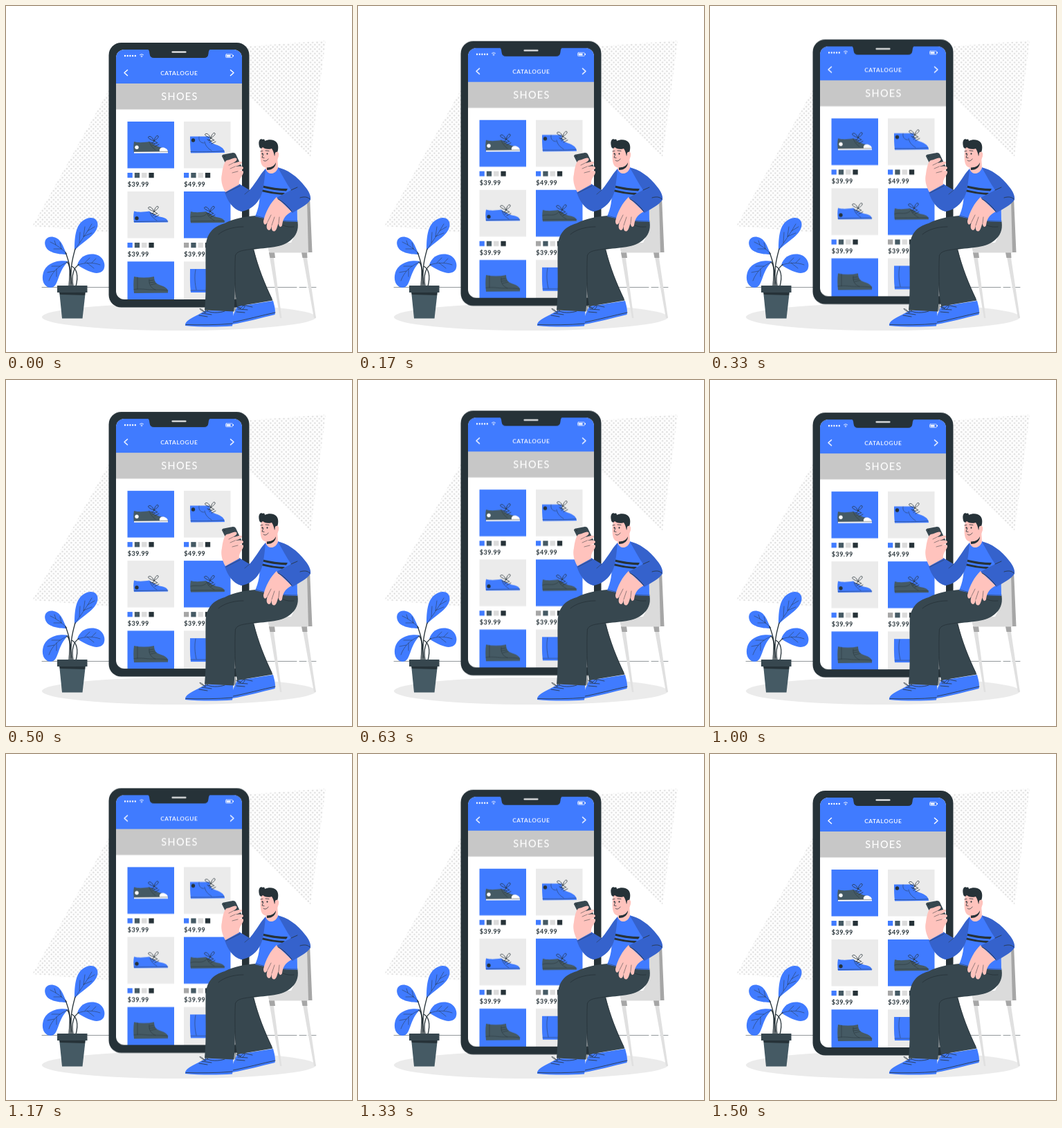
Animation, 500 px wide and 500 px high, one loop 1540 ms. Source, as an HTML page:

```html
<!DOCTYPE html>
<html lang="en">
<head>
<meta charset="utf-8">
<title>Shoe catalogue</title>
<style>
html, body { margin: 0; width: 100%; height: 100%; overflow: hidden; background: #fff; }
svg { display: block; width: 100vw; height: 100vh; }
text { font-family: Lato, "Open Sans", sans-serif; }
.blue { fill: #407bff; }
.deep { fill: #3562cc; }
.ink { fill: #263238; }
.slate { fill: #455a64; }
.cloth { fill: #37474f; }
.pale { fill: #ebebeb; }
.skin { fill: #ffc3bd; }
.white { fill: #fff; }
.line { fill: none; stroke: #263238; stroke-width: .8; stroke-linecap: round; stroke-linejoin: round; }
.thin { stroke-width: .5; }
.wline { fill: none; stroke: #fff; stroke-width: 1.5; stroke-linecap: round; stroke-linejoin: round; }
.price { font-size: 9px; font-weight: 700; letter-spacing: .45px; fill: #263238; }
.title { fill: #fff; text-anchor: middle; }

/* 24 drawings a second: 17 steps up, 18 down, 2 to close */
#phone { animation: float 1540ms -4ms infinite; }
@keyframes float {
  0% { transform: translateY(0); animation-timing-function: steps(17); }
  45.946% { transform: translateY(-9.8px); animation-timing-function: steps(18); }
  94.595% { transform: translateY(.4px); animation-timing-function: steps(2); }
  100% { transform: translateY(-.4px); }
}
</style>
</head>
<body>
<svg viewBox="0 0 500 500">
  <defs>
    <pattern id="dots" width="6.4" height="6.4" patternUnits="userSpaceOnUse">
      <g fill="#e0e0e0"><circle cx="1.6" cy="1.6" r="1.3"/><circle cx="4.8" cy="4.8" r="1.3"/></g>
    </pattern>
    <clipPath id="screen"><rect x="159" y="63" width="182" height="361" rx="12"/></clipPath>
    <g id="swatches">
      <rect x="10.3" width="7.3" height="7.3" class="slate"/>
      <rect x="20.6" width="7.3" height="7.3" fill="#dbdbdb"/>
      <rect x="30.9" width="7.3" height="7.3" class="ink"/>
    </g>
    <g id="laces" class="line">
      <path d="M0 0C-6-2-10-5-8-6C-5-8-2-4 0 0C1-5 4-9 6-7C7-5 3-2 0 0L-3 4M0 0L5 3M-5 2L1 4M-2 6L4 3M1 8L7 5"/>
    </g>
    <path id="low" d="M1 0C8 2 16 1 23 0C27 3 32 6 38 8C45 9 50 11 50 16L1 16.500C0 11 0 5 1 0Z"/>
  </defs>

  <path d="M160 101L38 318L160 328ZM340 59L462 50L440 218L340 119Z" fill="url(#dots)"/>
  <ellipse cx="250" cy="449.500" rx="198" ry="19.500" class="pale"/>
  <path class="line thin" d="M52 406.500H420M424 406.500H434M437 406.500H448"/>

  <g id="phone">
    <rect x="148.500" y="53" width="203" height="382.500" rx="18" class="ink"/>
    <g clip-path="url(#screen)">
      <rect x="159" y="63" width="182" height="361" class="white"/>
      <rect x="159" y="63" width="182" height="49" class="blue"/>
      <rect x="159" y="112" width="182" height="37.500" fill="#c7c7c7"/>
      <path class="ink" d="M203 62C207 63 207 65 207.500 69Q208 75 214 75H286Q292 75 292.500 69C293 65 293 63 297 62Z"/>

      <path d="M172 72H187" stroke="#fff" stroke-width="2.400" stroke-linecap="round" stroke-dasharray="0 3.700"/>
      <path class="wline" stroke-width="1" d="M193.500 70.500Q196 68.600 198.500 70.500M195 72.300Q196 71.500 197 72.300" style="stroke-width:.9"/>
      <circle cx="196" cy="73.600" r=".6" class="white"/>
      <rect x="317.500" y="69.700" width="10" height="4.800" rx="1" class="wline" style="stroke-width:.7"/>
      <path class="white" d="M318.500 70.700h6v2.800h-6zM328 71h1v2h-1z"/>
      <path class="wline" d="M175.500 92.500L171 96.500L175.500 100.500M324.500 92.500L329 96.500L324.500 100.500"/>
      <text class="title" x="250.300" y="99.500" font-size="8.400" font-weight="600" letter-spacing=".6">CATALOGUE</text>
      <text class="title" x="251" y="135.600" font-size="14.500" font-weight="500" letter-spacing="1.300">SHOES</text>

      <path class="blue" d="M175.500 167h67.500v67.500h-67.500zM257 268h67.500v67.500h-67.500zM175.500 369.300h67.500v60h-67.500zM175.500 241h7.300v7.300h-7.300zM257 241h7.300v7.300h-7.300zM175.500 342h7.300v7.300h-7.300z"/>
      <path class="pale" d="M257 167h67.500v67.500h-67.500zM175.500 268h67.500v67.500h-67.500zM257 369.300h67.500v60h-67.500z"/>
      <path fill="#a6a6a6" d="M257 342h7.300v7.300h-7.300z"/>
      <use href="#swatches" x="175.500" y="241"/>
      <use href="#swatches" x="257" y="241"/>
      <use href="#swatches" x="175.500" y="342"/>
      <use href="#swatches" x="257" y="342"/>
      <text class="price" x="175.800" y="260.500">$39.99</text>
      <text class="price" x="257.300" y="260.500">$49.99</text>
      <text class="price" x="175.800" y="361.500">$39.99</text>
      <text class="price" x="257.300" y="361.500">$39.99</text>

      <!-- canvas sneaker -->
      <use href="#low" x="184" y="196" class="slate"/>
      <path class="white" d="M185 210.500L222 210C221 206 224 204 228 204.500C233 206 234.500 209 234 212.500L185 212.800Z"/>
      <circle cx="189" cy="204.300" r="2.700" class="white"/>
      <path class="line thin" d="M185 210.500L234 210.300M207 196C209 202 212 205 216 208"/>
      <use href="#laces" x="214" y="195"/>

      <!-- mid sneaker -->
      <path class="blue" d="M266 188.500H294.500C294 193 296 197 300 199C308 202 316 205 316 212L267 212.500C266 204 266 196 266 188.500Z"/>
      <circle cx="270.500" cy="194" r="2.700" class="ink"/>
      <path class="line thin" d="M267 210.500C280 211 298 211 315 209.500M287 196C288 202 292 206 297 209M279 189C278 194 281 198 286 198"/>
      <use href="#laces" x="296" y="191"/>

      <use href="#low" x="184" y="296.500" class="blue"/>
      <circle cx="189" cy="306.800" r="2.700" class="ink"/>
      <path class="line thin" d="M185 311.500L234 311M208 298C209 303 213 307 218 310"/>
      <use href="#laces" x="214" y="297"/>

      <use href="#low" x="266" y="297" class="slate"/>
      <path class="line thin" d="M267 311L316 310.500M267 305C275 302 284 308 291 299C291 304 296 307 301 310"/>
      <use href="#laces" x="295" y="297"/>

      <!-- boots -->
      <path class="slate" d="M185 391Q199 394 214 391C214 399 218 402 223 403.500C231 406 235 409 234 414.500L185 415C184 407 184 398 185 391Z"/>
      <path class="line thin" d="M185 409.500C196 408 202 410 211 410S227 410 234 411M190 392V409M207 397L213 396M207 400L215 399M209 403L217 401M207 395C206 403 210 408 216 410"/>
      <path class="blue" d="M266 380H296V405L316 414L267 414C265.500 402 266 390 266 380Z"/>
      <path class="line thin" d="M267 411H300M274 381C272 390 273 402 275 410"/>
    </g>
    <path class="wline" style="stroke-width:2.200" d="M240.500 66.500H259.500"/>
  </g>

  <!-- chair -->
  <path fill="#e0e0e0" d="M380 357H386L398.500 451H396ZM428 357H434L448 451H445Z"/>
  <path fill="#a6a6a6" d="M380 356H388L389 364H381.500ZM427 356H435L435.500 364H428.500ZM433 277L439 276L442.500 356H436Z"/>
  <path fill="#dbdbdb" d="M416 284L435 279L437 356.500H381Q377 352 381 343L412 342Q419 330 420 310Z"/>

  <!-- shoes and legs -->
  <path class="blue" d="M327 458C326 451 329 445 334 434L386 426C388 433 390 441 388.500 446C370 450 347 457 327 460Z"/>
  <path class="line" d="M328 457C348 453 370 447 389 443M335 434C340 430 350 434 356 435M335 438L349 439M333 442L345 443M339 437C332 432 329 434 339 437C343 431 349 432 342 438"/>
  <path class="cloth" d="M326 350L357 347C364 378 374 401 385.500 425.500L334 434C330 409 328 380 326 350Z"/>
  <path class="blue" d="M259 462C258 453 275 449 288 440L328 440.500C329 448 328 456 327 462.500C306 464 280 464 259 462Z"/>
  <path class="line" d="M260 460.500C281 461 305 461 327 459M290 440C294 444 308 444 316 441M283 444L297 446M279 447L291 449M288 443C281 435 274 436 288 443C289 434 296 432 290 442"/>
  <path class="cloth" d="M361 303C347 304 329 307 316 314C298 319 289 330 288.500 350C288 379 290 410 287 439.500L329.500 441.500C332 411 330 382 331 360C334 354 344 354 356 352C377 349 400 350 413 337C422 329 423 319 421 309Z"/>
  <path class="line" d="M331 440C332 411 330 384 331.500 360C335 352 349 353 362 350M307 330C315 323 329 319 343 319M416 319C408 320 402 318 398 316M358 353C365 380 374 402 384 423"/>

  <!-- torso -->
  <path class="blue" d="M375 235C384 240 390 237 393 233C404 237 415 245 420 254L421 312C400 312 378 309 360 304C365 293 368 279 366 264C366 252 369 241 375 235Z"/>
  <path class="ink" d="M369 259C382 262 395 264 407 264L405 267.500C392 267 380 265 369 262ZM369 265C381 268 393 270 403 270L400 273C388 272 378 270 369 268Z"/>
  <path class="line thin" d="M361 303C380 309 400 311 420 311"/>

  <!-- arm with handset -->
  <path class="deep" d="M375 236C368 241 364 252 352 266L337 257L316 269C320 282 328 294 340 297C354 295 366 284 370 270C373 259 374 246 375 236Z"/>
  <path class="line thin" d="M318 270L338 260M352 266L345 272"/>
  <path class="cloth" d="M312 217Q312 215 315 214.500L328 212Q331 212 332 214L341 233L323 239Z"/>
  <path class="skin" d="M312 243C313 235 315 225 319 223C325 222 330 218 333 220C335 223 331 225 328 227C334 226 340 223 341 226C341 229 335 231 331 232C337 231 343 231 343 234C343 236 338 238 335 239C339 238 344 237 343 241C341 247 336 250 337 258L317 269C312 260 310 251 312 243Z"/>
  <path class="line thin" d="M328 227L322 230M331 232L324 235M335 239L327 241"/>
  <circle cx="316" cy="217.500" r="1" class="ink"/>

  <!-- resting arm -->
  <path class="skin" d="M391 276C382 285 375 297 372 311C372 315 374 317 376 315L378 312C376 318 376 323 380 324C383 324 383 320 384 317C383 323 385 327 389 325C392 322 392 317 394 314C394 319 397 321 399 317C400 309 402 303 413 297Z"/>
  <path class="line thin" d="M378 312L383 302M384 317L388 305M394 314L395 305"/>
  <path class="deep" d="M393 234C405 235 421 246 433 262C438 268 441 275 440 280C435 288 423 293 414 299C407 291 398 283 391 277L412 266C405 256 399 244 393 234Z"/>
  <path class="line" d="M412 266L421 262M393 279C401 283 408 290 413 297M425 277C432 275 436 276 439 279"/>

  <!-- head -->
  <path class="skin" d="M375 235L378 226L392 216L393 234C390 243 379 246 375 235Z"/>
  <path class="ink" d="M377 233C383 234 388 231 390 226C390 232 386 237 377 237Z"/>
  <path class="skin" d="M369 203C367 214 367 225 370 230C373 235 380 234 385 230C390 227 393 222 394 216C395 211 391 209 388 213L387 202Z"/>
  <path class="ink" d="M366 203C364 196 367 190 371 193C373 192 374 193 374 195C380 192 388 193 391 197C395 202 393 210 391 214L388 217C387 212 386 209 384 206C378 208 373 206 371 204C369 207 367 206 366 203Z"/>
  <path class="skin" d="M389 212C392 209 395 212 394 216C393 220 390 221 388 219Z"/>
  <path class="line" d="M368 210L371 209.500M375 209L380 209.500M372 214L370 219L373 219.500M372 223C374 225 377 224 379 221"/>
  <ellipse cx="370.500" cy="213.500" rx=".9" ry="1.300" class="ink"/>
  <ellipse cx="377.500" cy="213.500" rx=".9" ry="1.300" class="ink"/>

  <!-- plant -->
  <g class="blue">
    <path d="M99 353C99 332 101 316 113 309C122 303 132 306 132.500 315C133 330 113 339 99 353Z"/>
    <path d="M88 359C74 359 60 356 57 347C54 338 60 332 69 334C80 336 83 349 88 359Z"/>
    <path d="M103 374C107 362 117 357 129 359C140 361 145 373 141 381C135 390 121 386 103 374Z"/>
    <path d="M90 369C76 366 57 371 53.500 387C51 398 56 407 65 407C77 406 73 385 90 369Z"/>
  </g>
  <path class="line" style="stroke-width:1.300" d="M95 405C92 380 96 365 100 351M93 405C95 383 91 369 86 356M97 405C94 389 98 378 105 374M91 405C92 391 94 374 88 370M101 405C105 389 102 380 95 376"/>
  <path class="line thin" d="M99 353C107 341 117 328 124 315M106 342L107 327M112 333L114 319M112 333L124 328M118 325L128 319M88 358C81 351 73 345 64 341M80 351L78 342M80 351L69 351M72 345L70 339M104 374C114 371 125 370 136 374M114 371L121 364M124 371L130 365M117 371L127 379M90 370C78 374 67 383 62 397M78 376L66 376M70 383L60 385M73 380L73 391"/>
  <path class="slate" d="M77 412H115L110.500 451.500H81Z"/>
  <path class="ink" d="M77 413H114.500L114 418L78 417Z"/>
  <rect x="74" y="404" width="43.500" height="10" class="cloth"/>
</svg>
</body>
</html>
```
